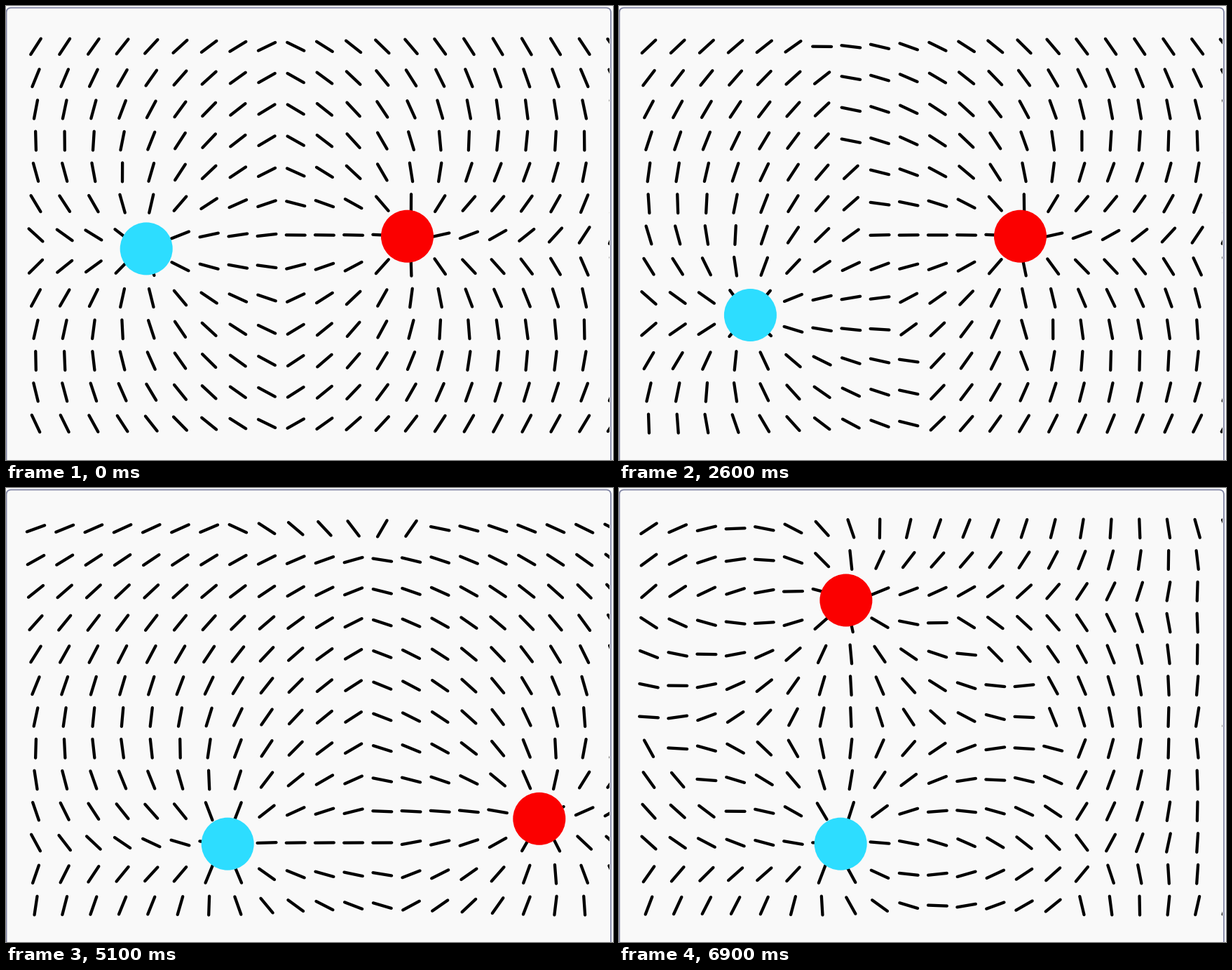
Write a matplotlib script that moves like this. It is 866x647 px and loops after 8.7 s.

```python
import numpy as np
import matplotlib.pyplot as plt
from matplotlib.animation import FuncAnimation
from matplotlib.collections import LineCollection
from matplotlib.patches import Circle, FancyBboxPatch, Rectangle

WIDTH, HEIGHT, DPI = 866, 647, 100
STEP_MS, LOOP_MS = 100, 8700
UNIT = 1.791               # pixels per stage unit
NEEDLE = 15 * UNIT
RADIUS = 37.5
PX_TO_PT = 72 / DPI
PAPER, EDGE = "#f9f9f9", "#7f83a3"

# Drag paths as (time in ms, x, y)
POSITIVE_PATH = [
    [(1100, 200.2, 345.9), (1700, 338.1, 236.4)],
    [(1900, 338.1, 236.4), (2600, 187.4, 440.5), (3100, 316.2, 507.2)],
]
NEGATIVE_PATH = [
    [(3700, 572.5, 328.2), (4100, 669.6, 200.9), (5100, 760.8, 471.3),
     (6100, 424.1, 224.2), (6900, 323.9, 160)],
]

columns = 42.5 + 23 * UNIT * np.arange(21)
rows = 57.8 + 25 * UNIT * np.arange(13)
grid = np.stack(np.meshgrid(columns, rows), axis=-1).reshape(-1, 2)


def glide(keys, t):
    """Smooth cubic path through the keys, at rest at both ends."""
    keys = np.array(keys, float)
    times, points = keys[:, 0], keys[:, 1:]
    t = np.clip(t, times[0], times[-1])
    speed = np.gradient(points, times, axis=0)
    speed[[0, -1]] = 0
    i = min(np.searchsorted(times, t, side="right") - 1, len(times) - 2)
    span = times[i + 1] - times[i]
    u = (t - times[i]) / span
    return ((2 * u**3 - 3 * u**2 + 1) * points[i]
            + (u**3 - 2 * u**2 + u) * span * speed[i]
            + (3 * u**2 - 2 * u**3) * points[i + 1]
            + (u**3 - u**2) * span * speed[i + 1])


def position(path, t):
    started = [keys for keys in path if keys[0][0] <= t]
    return glide(started[-1] if started else path[0], t)


def needles(positive, negative):
    """Point along the nearest charge's ray, bent by the detour past the other."""
    away, toward = grid - positive, negative - grid
    r_pos, r_neg = np.hypot(*away.T), np.hypot(*toward.T)
    gap = np.hypot(*(negative - positive))
    ray = np.where((r_pos < r_neg)[:, None], away, toward)
    angle = np.degrees(np.arctan2(-ray[:, 1], ray[:, 0]))
    near, far = np.minimum(r_pos, r_neg), np.maximum(r_pos, r_neg)

    bend = (near + far - gap) / UNIT / 5
    flatten = np.where(np.abs(angle) < 90, near < gap, far > gap)
    side = np.where(angle > 0, 1, -1) * np.where(flatten, -1, 1)
    a = np.radians(angle + side * bend)
    half = NEEDLE / 2 * np.column_stack([np.cos(a), -np.sin(a)])
    return np.stack([grid - half, grid + half], axis=1)


fig = plt.figure(figsize=(WIDTH / DPI, HEIGHT / DPI), dpi=DPI, facecolor="white")
ax = fig.add_axes([0, 0, 1, 1])
ax.set_xlim(0, WIDTH)
ax.set_ylim(HEIGHT, 0)
ax.axis("off")

ax.add_patch(FancyBboxPatch((0.5, 2.5), 862.5, 700, fc=PAPER, ec=EDGE,
                            boxstyle="round,pad=0,rounding_size=7",
                            lw=1.8 * PX_TO_PT, zorder=1))
field = LineCollection([], colors="black", linewidths=4.3 * PX_TO_PT,
                       capstyle="round", zorder=2)
ax.add_collection(field)
field.set_clip_path(Rectangle((2, 3), 859.3, HEIGHT, transform=ax.transData))
positive_disc = ax.add_patch(Circle((0, 0), RADIUS, fc="#2dddff", lw=0, zorder=3))
negative_disc = ax.add_patch(Circle((0, 0), RADIUS, fc="#fb0000", lw=0, zorder=3))


def update(frame):
    t = frame * STEP_MS
    positive = position(POSITIVE_PATH, t)
    negative = position(NEGATIVE_PATH, t)
    positive_disc.center = positive
    negative_disc.center = negative
    field.set_segments(needles(positive, negative))
    return field, positive_disc, negative_disc


animation = FuncAnimation(fig, update, frames=LOOP_MS // STEP_MS,
                          interval=STEP_MS, repeat=True, repeat_delay=0)
plt.show()
```
